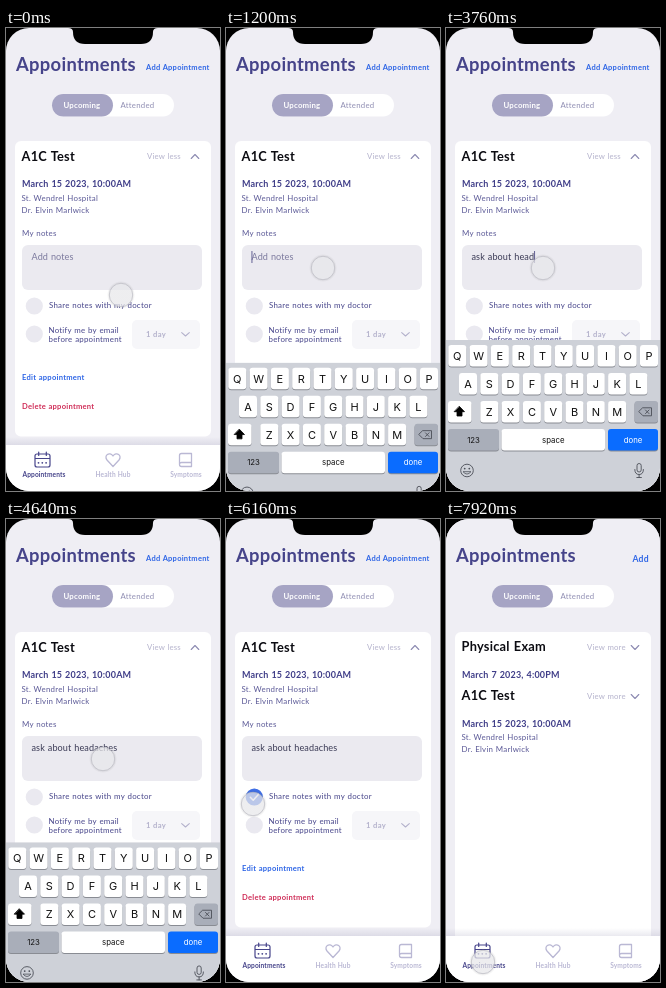
Write an HTML page that moves like this. It is 214x463 px and loops after 8 s.

```html
<!DOCTYPE html>
<html lang="en">
<head>
<meta charset="utf-8">
<title>Appointments</title>
<style>
  html, body { margin: 0; width: 100%; height: 100%; overflow: hidden; background: #000; }
  svg { display: block; width: 100vw; height: 100vh; }
  text { font-family: Lato, "Open Sans", sans-serif; white-space: pre; word-spacing: .05em; }
  .key text { font-family: Inter, Roboto, sans-serif; letter-spacing: 0; }
</style>
</head>
<body>
<svg id="stage" viewBox="0 0 214 463"></svg>
<script>
const LOOP = 8000;
const INK = '#46448a', SOFT = '#b4b2cc', BLUE = '#2f66e6', NOTE = 'ask about headaches';

// Markup helpers
const text = (x, y, str, size, fill, weight = 400, spacing = .24, extra = '') =>
  `<text x="${x}" y="${y}" font-size="${size}" fill="${fill}" font-weight="${weight}" letter-spacing="${spacing}" ${extra}>${str}</text>`;
const rect = (x, y, w, h, r, fill, extra = '') =>
  `<rect x="${x}" y="${y}" width="${w}" height="${h}" rx="${r}" fill="${fill}" ${extra}/>`;
const circle = (x, y, r, fill, extra = '') =>
  `<circle cx="${x}" cy="${y}" r="${r}" fill="${fill}" ${extra}/>`;
const line = (d, stroke, width = 1.1, fill = 'none') =>
  `<path d="${d}" stroke="${stroke}" stroke-width="${width}" fill="${fill}" stroke-linecap="round" stroke-linejoin="round"/>`;
const chevron = (x, y, dy, color = '#8d8bb2') =>
  line(`M${x - 3.8} ${y - dy}L${x} ${y + dy}L${x + 3.8} ${y - dy}`, color);
const body = (x, y, str) => text(x, y, str, 7.9, '#5a5896');
const date = (y, str) => text(16, y, str, 9, '#3f3d88', 700, .2);
const heading = (y, str) => text(15.5, y, str, 12.8, '#0c0c12', 700, .25);
const toggle = (y, label) => text(141, y, label, 7.8, SOFT, 400, .17);
const place = y => body(15.5, y, 'St. Wendrel Hospital') + body(15.5, y + 12.4, 'Dr. Elvin Marlwick');

function details() {
  return text(140, 42, 'Add Appointment', 7.5, BLUE, 700, .26) +
    rect(9, 113, 196, 295.5, 6, '#fff') +
    heading(133, 'A1C Test') + toggle(131.3, 'View less') + chevron(189, 128.5, -2) +
    date(159, 'March 15 2023, 10:00AM') + place(172.8) +
    body(16, 208, 'My notes') +
    rect(16, 217, 180, 45, 6, '#ebeaf0') +
    text(25.5, 232.3, '', 9.1, '#7c7a9e', 400, .1, 'id="note"') +
    rect(25.5, 223, .9, 12, 0, '#55538a', 'id="caret"') +
    circle(28.3, 278, 8.6, '#eae9f0') + circle(28.3, 306, 8.6, '#eae9f0') +
    `<g id="check">${circle(28.3, 278, 8.6, '#3f6fe6')}${line('M24.3 278.3L27.2 281.2L32.6 275.3', '#fff', 1.5)}</g>` +
    text(43, 280, 'Share notes with my doctor', 7.9, INK) +
    text(42.5, 304.5, 'Notify me by email', 7.9, INK) +
    text(42.5, 314, 'before appointment', 7.9, INK) +
    rect(126, 292, 68, 29, 5, '#f6f6f9') +
    text(140, 309, '1 day', 7.6, SOFT, 700) + chevron(179.5, 306.3, 1.7, SOFT) +
    text(16, 352, 'Edit appointment', 7.6, BLUE, 700) +
    text(16, 381, 'Delete appointment', 7.6, '#d0305a', 700);
}

function list() {
  return rect(0, 0, 214, 463, 0, '#efeef4') +
    text(186.5, 43, 'Add', 8.6, BLUE, 700) +
    rect(9, 113, 196, 340, 6, '#fff') +
    heading(132, 'Physical Exam') + toggle(131.3, 'View more') + chevron(189, 128.5, 2) +
    date(159, 'March 7 2023, 4:00PM') +
    heading(181.3, 'A1C Test') + toggle(180.3, 'View more') + chevron(189, 177.5, 2) +
    date(207.7, 'March 15 2023, 10:00AM') + place(221);
}

function header() {
  return text(10, 42.7, 'Appointments', 18.4, INK, 700, .3) +
    rect(46, 66, 122, 22.5, 11.2, '#fff') +
    rect(46, 66, 61, 22.5, 11.2, '#a6a4c4') +
    text(57.5, 80, 'Upcoming', 7.8, '#fff', 700, .2) +
    text(114.5, 80, 'Attended', 7.8, '#8f8db2');
}

function tabBar() {
  const label = (x, str, fill) => text(x, 448.6, str, 6.6, fill, 700, .1, 'text-anchor="middle"');
  const pale = '#bab8d4';
  const dots = [32.5, 36.3, 40.1].map(x => circle(x, 434.8, .9, INK)).join('');
  return rect(0, 409, 214, 9, 0, 'url(#shade)') + rect(0, 417, 214, 46, 0, '#fff') +
    line('M31 426h11q2 0 2 2v9q0 2-2 2h-11q-2 0-2-2v-9q0-2 2-2zM29 430.5h15M32.7 424v3.4M40.3 424v3.4', INK, 1.2) + dots +
    line('M107 438.5L101 432C97.5 427.5 103.5 423 107 428C110.5 423 116.5 427.5 113 432Z', pale, 1.3) +
    line('M175.5 425.5h10v13h-10q-2 0-2-2v-9q0-2 2-2zM173.5 436q0-1.5 2-1.5h10', pale, 1.3) +
    label(38, 'Appointments', INK) + label(107, 'Health Hub', pale) + label(180, 'Symptoms', pale);
}

function keyboard() {
  const key = (x, y, w, label, size = 11, fill = '#fff', ink = '#111') =>
    `<g class="key">${rect(x, y + 1, w, 21.5, 3, '#898c93')}${rect(x, y, w, 21.5, 3, fill)}` +
    text(x + w / 2, y + 10.8 + size * .36, label, size, ink, 400, 0, 'text-anchor="middle"') + '</g>';
  const row = (letters, x, y) =>
    [...letters].map((c, i) => key(x + i * 21.3 - 9, y, 18, c)).join('');
  const gray = '#a9aeb9', dark = '#4c5058';
  return rect(0, 312, 214, 151, 0, '#ced1d8') +
    row('QWERTYUIOP', 11.3, 317) + row('ASDFGHJKL', 22, 345) + row('ZXCVBNM', 43.3, 373) +
    key(2, 373, 23.5, '') + line('M13.5 378.5L18.5 383.7H16V388H11V383.7H8.5Z', '#000', .8, '#000') +
    key(188.5, 373, 23.5, '', 8, gray) +
    line('M197 379.8h8.5v8h-8.5l-4-4zM199.5 382l3.5 3.6M203 382l-3.5 3.6', dark, .9) +
    key(2, 401, 51, '123', 7.8, gray) + key(55.5, 401, 103.5, 'space', 7.8) +
    key(162, 401, 50, 'done', 7.8, '#0a6cff', '#fff') +
    circle(21, 442.5, 6.3, 'none', `stroke="${dark}" stroke-width=".9"`) +
    circle(18.7, 440.6, .9, dark) + circle(23.3, 440.6, .9, dark) + line('M17.3 444q3.7 4.4 7.4 0z', dark, .8) +
    rect(191, 435.5, 4.2, 8.5, 2.1, 'none', `stroke="${dark}" stroke-width=".9"`) +
    line('M188.8 441.5q0 5 4.3 5t4.3-5M193.1 446.5v3M190.8 449.5h4.6', dark, .9);
}

const stage = document.getElementById('stage');
stage.innerHTML = `<defs>
  <clipPath id="screen"><rect width="214" height="463" rx="23"/></clipPath>
  <linearGradient id="shade" x2="0" y2="1"><stop stop-color="#8886a8" stop-opacity="0"/><stop offset="1" stop-color="#8886a8" stop-opacity=".2"/></linearGradient>
  <radialGradient id="halo"><stop offset=".78" stop-color="#555" stop-opacity=".28"/><stop offset="1" stop-color="#555" stop-opacity="0"/></radialGradient>
  </defs>
  <g clip-path="url(#screen)">
    ${rect(0, 0, 214, 463, 0, '#efeef4')}
    <g id="details">${details()}</g><g id="list">${list()}</g>
    ${header()}${tabBar()}
    <g id="keyboard">${keyboard()}</g>
    <g id="touch">${circle(0, 0, 14, 'url(#halo)', 'opacity=".6"')}${circle(0, 0, 11.7, '#f4f4f7', 'fill-opacity=".68" stroke="#b9b9c2" stroke-width=".7"')}</g>
  </g>
  <path d="M62 0Q67 0 67 4Q67 16 79 16H135Q147 16 147 4Q147 0 152 0Z"/>`;

const [note, caret, check, listView, keys, touch] =
  ['note', 'caret', 'check', 'list', 'keyboard', 'touch'].map(id => document.getElementById(id));

const progress = (t, from, to) => Math.min(1, Math.max(0, (t - from) / (to - from)));
const easeOut = p => 1 - (1 - p) ** 3;
const easeInOut = p => p < .5 ? 4 * p ** 3 : 1 - 4 * (1 - p) ** 3;
const glide = p => p * p * (3 - 2 * p);

// start, end, x, y
const moves = [[40, 760, 97, 240], [4960, 5680, 27, 285], [6800, 7640, 37, 443]];

function draw(t) {
  let x = 115, y = 267;
  for (const [from, to, tx, ty] of moves) {
    const p = glide(progress(t, from, to));
    x += (tx - x) * p;
    y += (ty - y) * p;
  }
  touch.setAttribute('transform', `translate(${x} ${y})`);

  const raised = easeOut(progress(t, 960, 1476)) - easeInOut(progress(t, 4560, 4864));
  keys.setAttribute('transform', `translate(0 ${151 * (1 - raised)})`);
  keys.style.display = raised > 0 ? '' : 'none';

  const count = Math.min(NOTE.length, Math.max(0, Math.floor((t - 1600) / 160) + 1));
  note.textContent = count ? NOTE.slice(0, count) : 'Add notes';
  note.setAttribute('fill', count ? '#3a3a55' : '#7c7a9e');
  caret.setAttribute('x', 25.5 + (count ? note.getComputedTextLength() : 0));
  caret.style.display = t >= 960 && t < 4560 ? '' : 'none';

  check.style.opacity = progress(t, 5800, 5960);
  listView.style.opacity = progress(t, 7680, 7840);
}

const start = performance.now();
function tick() {
  draw((performance.now() - start) % LOOP);
  requestAnimationFrame(tick);
}
tick();
</script>
</body>
</html>
```
